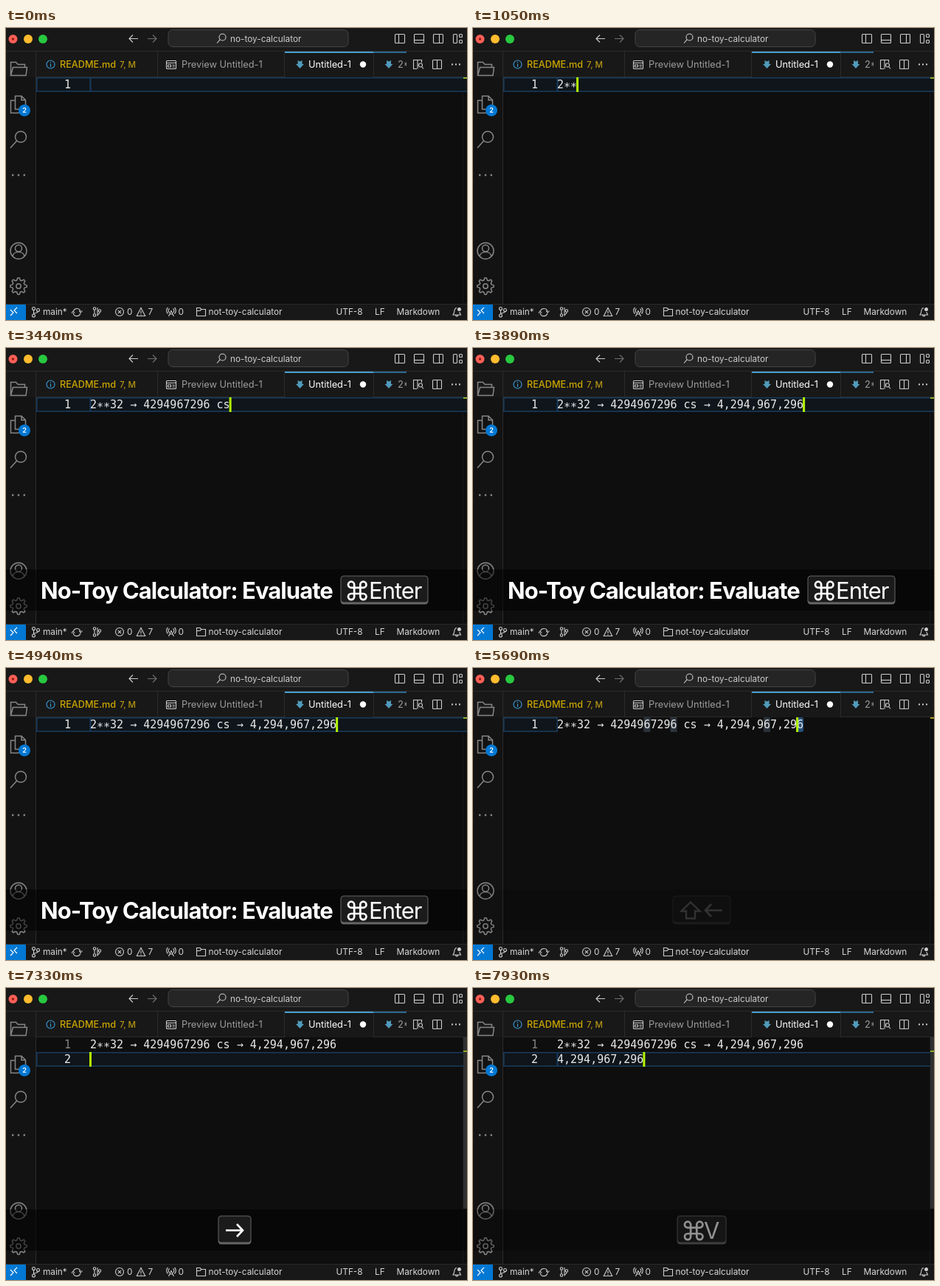
Write an HTML page that moves like this. It is 625 px wide and 397 px high and loops after 8000 ms.

```html
<!DOCTYPE html>
<html lang="en">
<head>
<meta charset="utf-8">
<title>Calculator in an editor</title>
<style>
html, body { margin: 0; width: 100%; height: 100%; overflow: hidden; background: #0e0e0e; }
svg { display: block; }
text { white-space: pre; font: 12.8px Inter, sans-serif; font-optical-sizing: none; fill: #ccc; }
.status text { font-size: 11.8px; fill: #d8d8d8; }
.code text { font: 15px "DejaVu Sans Mono", monospace; fill: #e8e8e8; }
.icon { fill: none; stroke: #ccc; stroke-width: 1.1; }
.side { fill: none; stroke: #868686; stroke-width: 1.5; }
#overlay text { font-size: 31px; letter-spacing: -1px; fill: #fff; }
#overlay .title { font-weight: 700; letter-spacing: -.95px; }
#overlay path { fill: none; stroke: #fff; }
</style>
</head>
<body>
<svg width="625" height="397" viewBox="0 0 625 397">
  <rect width="625" height="397" fill="#0e0e0e"/>
  <rect y="32" width="41" height="344" fill="#131313"/>
  <rect width="625" height="67" fill="#181818"/>
  <path d="M0 31.5H625M40.5 32V376M41 66.5H378M498 66.5H625M205.5 32V67M377.5 32V67M498.5 32V67" stroke="#2b2b2b"/>

  <!-- title bar -->
  <circle cx="9.5" cy="15" r="6" fill="#ff5f57"/><circle cx="9.5" cy="15" r="1.7" fill="#8c1a10"/>
  <circle cx="30" cy="15" r="6" fill="#febc2e"/>
  <circle cx="50" cy="15" r="6" fill="#28c840"/>
  <rect x="220" y="2.5" width="244" height="23" rx="6" fill="#252525" stroke="#444"/>
  <g class="icon">
    <path d="M179 14.5H167M172 9.5L167 14.5L172 19.5"/>
    <path d="M192 14.5H204M199 9.5L204 14.5L199 19.5" stroke="#707070"/>
    <circle cx="293.5" cy="12.5" r="4.5"/><path d="M290.3 15.7L286 20.5"/>
    <rect x="527.5" y="8.5" width="13" height="12" rx="1"/><path d="M532.5 8.5V20.5"/>
    <rect x="553.5" y="8.5" width="13" height="12" rx="1"/><path d="M553.5 16.5H566.5"/>
    <rect x="579.5" y="8.5" width="13" height="12" rx="1"/><path d="M587.5 8.5V20.5"/>
    <rect x="606.5" y="8.5" width="5" height="12" rx="1"/><rect x="614.5" y="8.5" width="4" height="4" rx="1"/><rect x="614.5" y="16.5" width="4" height="4" rx="1"/>
  </g>
  <text x="304" y="18.7" style="font-size:11.8px">no-toy-calculator</text>

  <!-- tabs -->
  <path d="M378 33H498" stroke="#4a9fd0" stroke-width="2"/>
  <path d="M498 33H543" stroke="#2d6a92" stroke-width="2"/>
  <g fill="none" stroke="#3794d0" stroke-width="1.2"><circle cx="60.5" cy="49.5" r="5.5"/><path d="M60.5 48.5V53M60.5 46V47.3"/></g>
  <text x="73" y="54" style="fill:#cca700;font-weight:500;font-size:12.7px">README.md</text>
  <text x="154" y="53.7" style="fill:#b39312;font-weight:500;font-size:11.5px">7, M</text>
  <g class="icon">
    <rect x="217.5" y="44.5" width="13" height="11" rx="1"/>
    <path d="M217.5 47.5H230.5M219.5 50H223.5V53H219.5ZM225.5 50.5H229M225.5 53H229"/>
    <path d="M557 55.5H552.5V43.5H563.5V47M558 43.5V55.5M563.5 52.5L566 55.5"/><circle cx="562" cy="50.5" r="2.5"/>
    <rect x="578.5" y="43.5" width="12" height="12" rx="1"/><path d="M584.5 43.5V55.5"/>
  </g>
  <text x="238" y="54" style="fill:#9d9d9d">Preview Untitled-1</text>
  <text x="410" y="54" style="fill:#fff">Untitled-1</text>
  <circle cx="484" cy="49.5" r="4.2" fill="#fff"/>
  <path id="mark" d="M395.5 44L398.5 45.5L401.5 44V49H404L398.5 55L393 49H395.5Z" fill="#519aba"/>
  <use href="#mark" x="120.5"/>
  <text x="531" y="54" style="fill:#9d9d9d">2*</text>
  <rect x="543" y="34" width="7" height="32" fill="#181818"/>
  <path d="M604 49.5h2m3 0h2m3 0h2" stroke="#ccc" stroke-width="2"/>

  <!-- side bar -->
  <g class="side">
    <path d="M6.5 64.500V46.500H13.500L16 49.500H25.500V53.500M6.500 64.500L9.500 53.500H28.500L27 64.500Z"/>
    <path d="M12.5 92.5H21L26.5 98V110.5H12.5ZM21 92.5V98H26.5M12.5 98.5H6.5V115.5H19.5V110.5"/>
    <circle cx="20" cy="148" r="7.5"/><path d="M14.5 153.5L6 163"/>
    <path d="M8 200h2.4m5.4 0h2.4m5.4 0h2.4" stroke-width="2.4"/>
    <circle cx="17" cy="303" r="11"/><circle cx="17" cy="299.5" r="4.5"/><path d="M9 310.5C10 302.5 24 302.5 25 310.5"/>
    <path id="gear"/><circle cx="17" cy="351" r="3.2"/>
  </g>
  <circle cx="25" cy="112" r="8" fill="#0078d4"/>
  <text x="25" y="115.3" text-anchor="middle" style="font-size:9px;font-weight:600;fill:#fff">2</text>

  <!-- editor -->
  <path d="M619.5 67V376" stroke="#181818"/>
  <g id="code" class="code"></g>

  <!-- status bar -->
  <rect y="376" width="625" height="21" fill="#181818"/>
  <path d="M0 375.5H625" stroke="#2b2b2b"/>
  <rect y="376" width="27" height="21" fill="#0078d4"/>
  <g class="icon">
    <path d="M6 383L10 387L6 391M15 380L11 384L15 388" stroke="#fff"/>
    <circle cx="37.5" cy="381.5" r="2"/><circle cx="37.5" cy="391" r="2"/><circle cx="43.5" cy="383.5" r="2"/><path d="M37.5 383.5V389M43.5 385.5C43.5 388 39 386.5 37.5 389"/>
    <path d="M91.5 384.5A5 5 0 0 1 101 385.5M100.8 388A5 5 0 0 1 91 387M99 384.5L101.2 387L103.5 384.5M88.8 387.5L91 385L93.2 387.5"/>
    <circle cx="120" cy="381.5" r="1.7"/><circle cx="120" cy="390.5" r="1.7"/><circle cx="127" cy="384.5" r="1.7"/><path d="M120 383.2V388.8M124 380V391.5M127 386.2C127 390 124 388 124 391.5"/>
    <circle cx="154" cy="386" r="5.5"/><path d="M151.8 383.8L156.2 388.2M156.2 383.8L151.8 388.2"/>
    <path d="M183 380.5L188.7 391.5H177.3ZM183 384.5V388M183 389V390.3"/>
    <path d="M220.5 392L224 384.5L227.5 392M222 389H226M221.5 387A3.5 3.5 0 0 1 221.5 381.5M226.5 387A3.5 3.5 0 0 0 226.5 381.5M219.5 388.5A6 6 0 0 1 219.5 380M228.5 388.5A6 6 0 0 0 228.5 380"/>
    <path d="M258.5 391.5V380.5H263L265 382.5H270.5V391.5ZM258.5 384.5H263L265 382.5"/>
    <path d="M611 380.5C607.5 381 608 385 607.5 387L606 390H616.5L615 387V386M609.5 390.5A1.8 1.8 0 0 0 613 390.5"/>
  </g>
  <circle cx="614.5" cy="382.5" r="2.5" fill="#ccc"/>
  <g class="status">
    <text x="50" y="390.3">main*</text><text x="164" y="390.3">0</text><text x="192.5" y="390.3">7</text>
    <text x="233.5" y="390.3">0</text><text x="274.5" y="390.3">not-toy-calculator</text>
    <text x="447.5" y="390.3">UTF-8</text><text x="500" y="390.3">LF</text><text x="529.5" y="390.3">Markdown</text>
  </g>
  <g id="overlay"></g>
</svg>
<script>
const $ = id => document.getElementById(id);
const LEFT = 114, CHAR = 9.03, ROW = 20, TOP = 67, LOOP = 8000;
const colX = c => LEFT + c * CHAR;
const rect = (x, y, w, h, fill, more = '') =>
  `<rect x="${x}" y="${y}" width="${w}" height="${h}" fill="${fill}" ${more}/>`;
const text = (x, y, s, more = '') => `<text x="${x}" y="${y}" ${more}>${s}</text>`;

// gear with eight teeth
$('gear').setAttribute('d', 'M' + Array.from({ length: 32 }, (_, i) => {
  const r = i % 4 < 2 ? 11.3 : 8.3, a = (i - .5) * Math.PI / 16;
  return `${17 + r * Math.cos(a)} ${351 + r * Math.sin(a)}`;
}).join('L') + 'Z');

// key caps of the shortcut overlay
const cap = (x, w) =>
  rect(x + .5, 309.5, w - 1, 39, '#666', 'rx="4.5"') +
  rect(x + 1.5, 310.5, w - 3, 35, '#1b1b1b', 'rx="3.5"');
const command = x => `<path transform="translate(${x - 4.1} 313.6) scale(1.36)" stroke-width="2"
  d="M15 6v12a3 3 0 1 0 3-3H6a3 3 0 1 0 3 3V6a3 3 0 1 0-3 3h12a3 3 0 1 0-3-3"/>`;
const arrow = (x, dir) => `<path transform="translate(${x} 329.5) scale(${dir} 1)" stroke-width="2.6"
  d="M12 0H-11M-3 -8.5L-11 0L-3 8.5"/>`;
const overlays = {
  evaluate: text(47, 341, 'No-Toy Calculator: Evaluate', 'class="title"') +
    cap(453, 120) + command(464) + text(492, 341, 'Enter'),
  select: cap(270, 80) + arrow(326, 1) +
    '<path d="M295 318.5L307.5 330.5H301V340.5H289V330.5H282.5Z" stroke-width="2.4"/>',
  copy: cap(275, 70) + command(286) + text(313, 341, 'C'),
  right: cap(287, 46) + arrow(310, -1),
  paste: cap(276, 68) + command(287) + text(313, 341, 'V')
};

const sum = '2**32', result = sum + ' → 4294967296';
const unit = result + ' cs', number = '4,294,967,296', full = unit + ' → ' + number;
const off = { blink: true };

// [start, text, overlay, opacity, extras]
const steps = [
  [0, '', '', 0, off],
  [450, '2'], [900, '2*'], [1050, '2**'], [1650, '2**3'], [1800, sum],
  [2100, sum, 'evaluate', .13],
  [2250, result, 'evaluate', .75],
  [2390, result, 'evaluate', 1],
  [2690, result, 'evaluate', 1, off],
  [2990, result + ' ', 'evaluate', 1],
  [3440, unit, 'evaluate', 1],
  [3740, unit, 'evaluate', .4],
  [3890, full, 'evaluate', 1],
  [4340, full, 'evaluate', 1, off],
  [4940, full, 'evaluate', 1],
  [5090, full],
  [5390, full, '', 0, off],
  [5690, full, 'select', .15, { sel: 1 }],
  [5840, full, 'select', .75, { sel: 3 }],
  [5990, full, 'select', 1, { sel: 6 }],
  [6140, full, 'select', 1, { sel: 10 }],
  [6290, full, 'select', 1, { sel: 13 }],
  [6440, full, 'select', 1, { sel: 13, bulb: true }],
  [6590, full, 'copy', .4, { sel: 13, bulb: true }],
  [6730, full, 'copy', 1, { sel: 13, bulb: true, blink: true }],
  [7030, full, 'right', .13],
  [7180, full, 'right', .75],
  [7330, full + '\n', 'right', 1],
  [7480, full + '\n'],
  [7780, full + '\n' + number, 'paste', .13],
  [7930, full + '\n' + number, 'paste', .55]
];

function editor(content, { sel = 0, blink, bulb }) {
  const lines = content.split('\n'), row = lines.length - 1, line = lines[row];
  const y = TOP + row * ROW, end = line.length, edge = 'stroke="#18395a" stroke-width="1.6"';
  let out = '';
  if (sel) {
    const part = line.slice(-sel);
    for (let i = line.indexOf(part); i >= 0 && i < end - sel; i = line.indexOf(part, i + 1))
      out += rect(colX(i), y, sel * CHAR, ROW, '#2b323b');
    out += rect(colX(end - sel), y, sel * CHAR, ROW, '#264f78', 'rx="3"');
  } else {
    out += rect(LEFT + .8, y + .8, 520, ROW - 1.6, '#0f151a', edge);
  }
  out += rect(41.8, y + .8, 72.4, ROW - 1.6, '#0f151a', edge);
  if (row) out += rect(620, TOP, 5, 233, '#303030'); // scroll bar
  out += rect(620, row ? y - 2 : y, 5, 2, sel ? '#a89a18' : '#8fae25');
  lines.forEach((s, i) => {
    const base = TOP + 15 + i * ROW;
    out += text(79, base, i + 1, i < row ? 'style="fill:#858585"' : '');
    out += text(LEFT, base, s.replaceAll('*', '∗')); // asterisks sit at mid height
  });
  if (bulb) out += '<circle cx="122.5" cy="73" r="4.9" fill="#ffcc00"/>' + rect(120.5, 77.5, 4, 3.5, '#9a7d10');
  if (!blink) out += rect(colX(end - sel) - 1, y, 3, ROW, '#b4f500');
  return out;
}

let shown;
function draw(now) {
  const t = now % LOOP, step = steps.findLast(s => s[0] <= t);
  if (step !== shown) {
    shown = step;
    const [, content, name, alpha = 0, extras = {}] = step;
    $('code').innerHTML = editor(content, extras);
    $('overlay').innerHTML = name ? rect(0, 301, 625, 56, '#000', 'opacity=".5"') + overlays[name] : '';
    $('overlay').setAttribute('opacity', alpha);
  }
  requestAnimationFrame(() => draw(performance.now() - start));
}
const start = performance.now();
draw(0);
</script>
</body>
</html>
```
